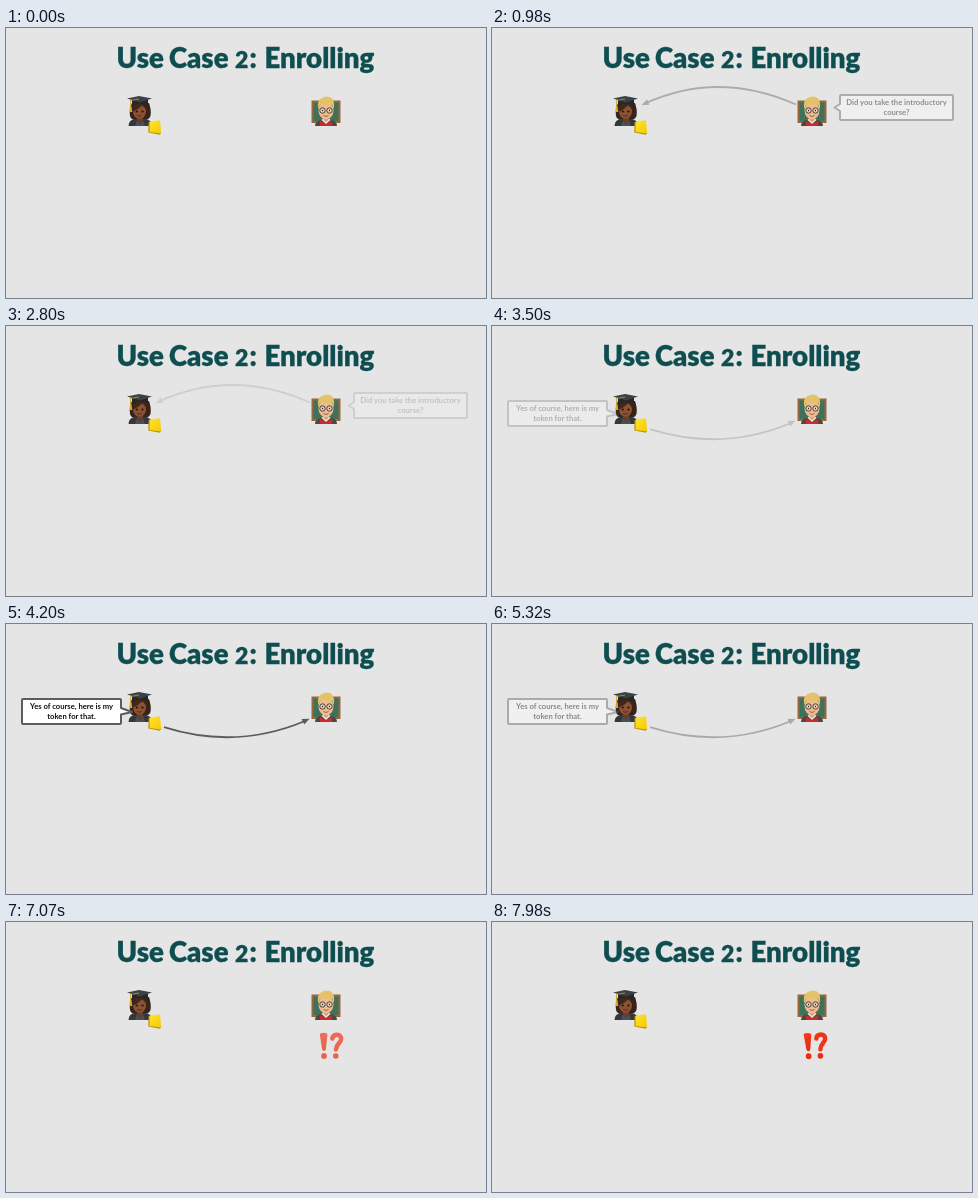
Write an HTML page that moves like this. It is 480 by 270 pixels and loops after 8000 ms.

```html
<!DOCTYPE html>
<html lang="en">
<head>
<meta charset="utf-8">
<title>Use Case 2: Enrolling</title>
<style>
  html, body { margin: 0; width: 100%; height: 100%; overflow: hidden; background: #e5e5e5; }
  svg { display: block; width: 480px; height: 270px; }
  .title { font: 900 27.6px Lato, sans-serif; fill: #0f4e50; stroke: #0f4e50; stroke-width: .3; }
  .title .low { font-size: 23px; }
  .talk { font: 700 7.65px Lato, sans-serif; text-anchor: middle; fill: #111; }
  .box { fill: #fff; stroke: #5c5c5c; stroke-width: 2; stroke-linejoin: round; }
  .line { fill: none; stroke: #5c5c5c; stroke-width: 1.8; }
  .tip { fill: #5c5c5c; }
</style>
</head>
<body>
<svg viewBox="0 0 480 270">
  <defs>
    <linearGradient id="red" x2="0" y2="1">
      <stop stop-color="#f83a1c"/><stop offset="1" stop-color="#e02c0e"/>
    </linearGradient>
    <linearGradient id="note" x2="1" y2="1">
      <stop stop-color="#ffe426"/><stop offset="1" stop-color="#f4c90a"/>
    </linearGradient>
  </defs>

  <text class="title" y="39.5"><tspan x="110.500">Use</tspan><tspan x="163">Case</tspan><tspan x="229" class="low">2</tspan><tspan x="243.500">:</tspan><tspan x="258.500">Enrolling</tspan></text>

  <g id="student">
    <path d="M126 75Q123 82 124 88Q125 92 130 92H138Q143 92 144.500 88Q145.500 82 143 75Z" fill="#38231b"/>
    <path d="M122.500 98Q122.500 92 129 91H139Q146 92 146.500 98Z" fill="#34383d"/>
    <path d="M131 88H137V92L134 95.500L131 92Z" fill="#6b3e26"/>
    <path d="M131 92L134 96L137 92L139 98H129Z" fill="#4b5056"/>
    <ellipse cx="133.500" cy="83.500" rx="6.500" ry="7.300" fill="#8a5233"/>
    <path d="M126.500 84Q126 76 133 75Q141 75 141.500 84Q139 79 136 77.500Q132 81.500 126.500 84Z" fill="#422719"/>
    <g fill="#20120d">
      <circle cx="130.800" cy="83.500" r="1.100"/><circle cx="136.500" cy="83.500" r="1.100"/>
    </g>
    <path d="M131.200 87.500Q133.500 89 135.800 87.500" fill="none" stroke="#5a2818"/>
    <path d="M126 72V77Q134 74 142 77V72Z" fill="#24282c"/>
    <path d="M121 70.500L133 68L146 70.500L134 74.500Z" fill="#3c4146"/>
    <path d="M133 71L124.500 72.500V79" fill="none" stroke="#c79a2a" stroke-width=".8"/>
    <path d="M124 78h1.500l.8 6h-3z" fill="#dba82c"/>
  </g>

  <g id="token">
    <path d="M142.500 94.500L144 93.500L155.200 105.500L153.500 106.800L142.300 104.500Z" fill="#b99508"/>
    <path d="M143.600 93.700L154 92.300L155.200 105.600L143.600 104Z" fill="url(#note)"/>
  </g>

  <g id="teacher">
    <path d="M305.500 72.500h29v22.500h-29z" fill="#99673c"/>
    <path d="M307.500 74.500h25v18.500h-25z" fill="#40715a"/>
    <path d="M309 98Q309 93 315 92H325Q331 93 331 98Z" fill="#57443f"/>
    <path d="M314 93L320 96L326 93V98H314Z" fill="#c92c30"/>
    <path d="M315.500 92L317 90.500H323L324.500 92L320 96Z" fill="#efe7df"/>
    <path d="M317.500 89H322.500V92L320 94L317.500 92Z" fill="#d49f73"/>
    <ellipse cx="320" cy="82.500" rx="7.500" ry="9" fill="#edbd91"/>
    <path d="M312.300 81Q310.500 73 315 70.500L318 69L320 68.500L324 69Q329.500 71.500 327.700 81L326 76.500Q320 77.500 317 75.500L314 77Z" fill="#e3c268"/>
    <g fill="#f6d9b8" stroke="#433a38">
      <circle cx="316.500" cy="82.500" r="2.700"/><circle cx="323.500" cy="82.500" r="2.700"/>
    </g>
    <path d="M315.900 82.500h1.200M322.900 82.500h1.200" stroke="#352420" stroke-width="1.300"/>
    <path d="M317.500 87.500Q320 89.500 322.500 87.500" fill="none" stroke="#a65e4b"/>
  </g>

  <g id="question" opacity="0">
    <path class="line" d="M304 76.500Q226 42 153 75.500"/>
    <path class="tip" d="M149.500 77.200L155 71.200L157.500 76.700Z"/>
    <path class="box" d="M349 67H460Q461 67 461 68V91Q461 92 460 92H349Q348 92 348 91V83L342.500 79.500L348 76V68Q348 67 349 67Z"/>
    <text class="talk" x="404.500" y="77">Did you take the introductory</text>
    <text class="talk" x="404.500" y="87">course?</text>
  </g>

  <g id="answer" opacity="0">
    <path class="line" d="M158 103.200Q230 126 299 97"/>
    <path class="tip" d="M303.500 94.700L298.300 100.500L295.500 95Z"/>
    <path class="box" d="M17 75H114Q115 75 115 76V84L126 88L115 90.500V99Q115 100 114 100H17Q16 100 16 99V76Q16 75 17 75Z"/>
    <text class="talk" x="65.500" y="85">Yes of course, here is my</text>
    <text class="talk" x="65.500" y="95">token for that.</text>
  </g>

  <g id="doubt" opacity="0">
    <path d="M313.800 112.500Q313.800 110.800 317.500 110.800Q321.500 110.800 321.400 113L319.900 127Q319.700 129 318 129Q316.300 129 316 127Z" fill="url(#red)"/>
    <circle cx="318" cy="134" r="2.900" fill="#e42f10"/>
    <path d="M326.300 116.500Q327 112.800 331 112.800Q335.300 113 335.100 117C335 121 330.300 121.500 330 127.500" fill="none" stroke="#f03417" stroke-width="4.500" stroke-linecap="round"/>
    <circle cx="329.800" cy="134" r="2.800" fill="#e42f10"/>
  </g>
</svg>
<script>
  const STEP = 70, LOOP = 8000;
  const [question, answer, doubt] = ["question", "answer", "doubt"].map(id => document.getElementById(id));
  const clamp = x => Math.min(1, Math.max(0, x));

  const fadeIn = (t, start, end) => t < start ? 0 : 0.24 + 0.76 * clamp((t - start) / (end - start));
  const fadeOut = (t, start, end) => 1 - clamp((t - start + STEP) / (end - start + STEP)) ** 1.75;
  const show = (el, opacity) => el.setAttribute("opacity", opacity);

  function draw(now) {
    const t = Math.floor(now % LOOP / STEP) * STEP;
    show(question, fadeIn(t, 840, 1470) * fadeOut(t, 2170, 2870));
    show(answer, fadeIn(t, 3500, 4200) * fadeOut(t, 4830, 5530));
    show(doubt, fadeIn(t, 6650, 7350));
    const tilt = clamp((t - 7840) / 140);
    doubt.setAttribute("transform", `translate(${-1.3 * tilt}) rotate(${-2 * tilt} 325 136)`);
    requestAnimationFrame(draw);
  }
  draw(performance.now());
</script>
</body>
</html>
```
